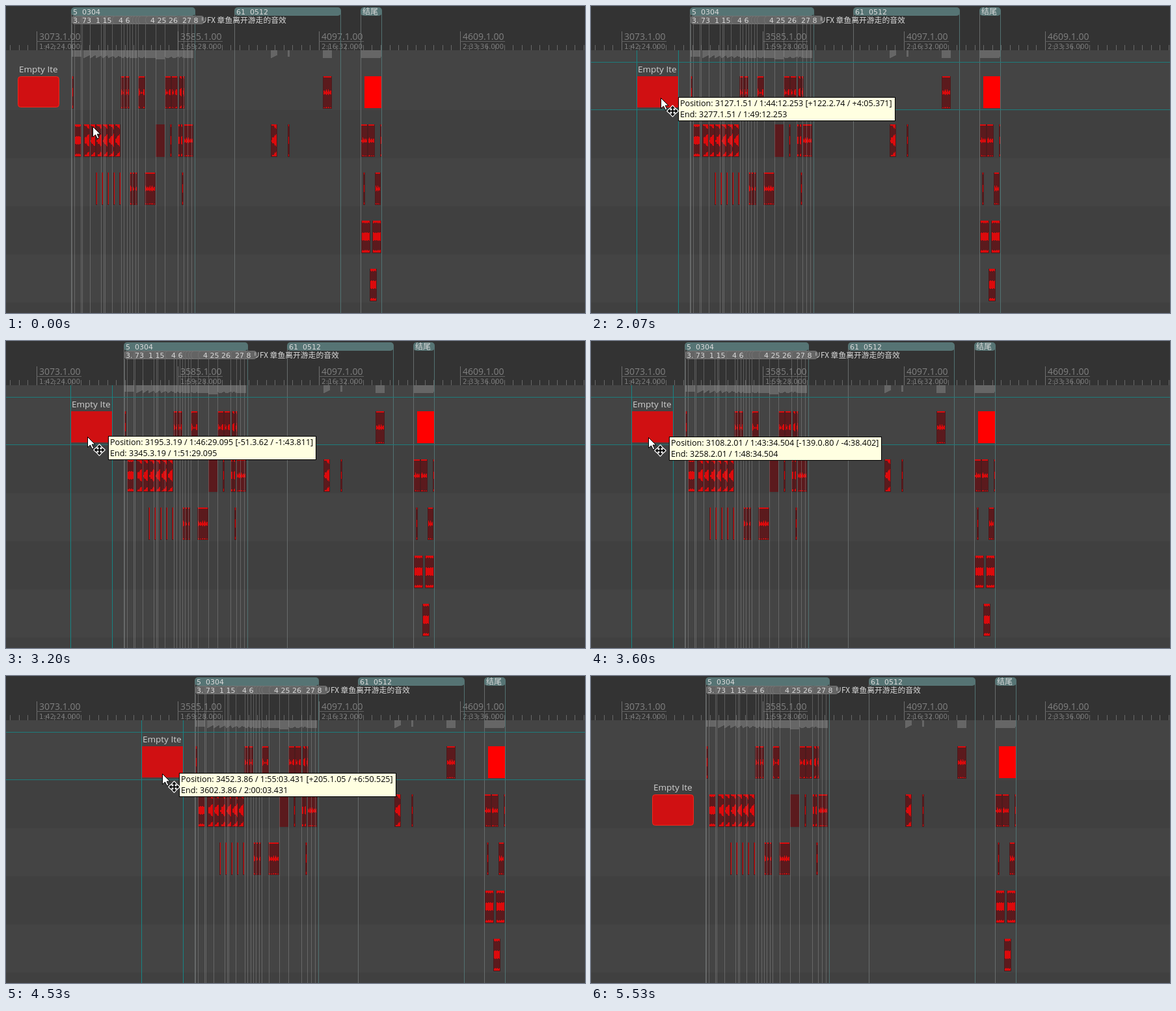
These frames come from a looping animation (890x472 px, 6190 ms). An HTML page with a canvas:

```html
<!DOCTYPE html>
<html lang="en">
<head>
<meta charset="utf-8">
<title>Timeline drag</title>
<style>
html, body { margin: 0; width: 100%; height: 100%; overflow: hidden; background: #444; }
canvas { display: block; }
</style>
</head>
<body>
<canvas id="stage" width="890" height="472"></canvas>
<script>
const W = 890, H = 472, LOOP = 6190, STEP = 200 / 3;
const TRACK = 74, SEC_PER_PX = 4.718677, START = 6006.882;
const ctx = document.getElementById('stage').getContext('2d');

const UI = '"Open Sans", "Noto Sans", sans-serif';
const SMALL = '"DejaVu Sans", "Noto Sans CJK SC", "Noto Sans CJK", sans-serif';
const CJK = '"Noto Sans CJK SC", "Noto Sans CJK", sans-serif';

const markers = [101, 105, 115, 117, 129, 146, 150, 152, 163];
for (let i = 0; i < 7; i++) markers.push(Math.round(177 + i * 4.3));
markers.push(214, 230, 244, 264, 273, 279, 285);

const clips = [];

// Fills a span of a track with equal clips
function addClips(track, shape, left, right = left + 3, count = 1) {
  const size = (right - left) / count;
  for (let i = 0; i < count; i++) {
    const x = Math.round(left + i * size);
    clips.push({ x, y: 108 + track * TRACK, w: Math.round(left + (i + 1) * size) - x, shape });
  }
}

addClips(0, 'mid', 101);
addClips(0, 'round', 176, 190, 2);
addClips(0, 'round', 203, 214);
addClips(0, 'round', 244, 264, 2);
addClips(0, 'fall', 266, 275, 2);
addClips(0, 'full', 487, 501);
addClips(0, 'bright', 551, 578);

addClips(1, 'mid', 105, 116);
addClips(1, 'fall', 119, 176, 6);
addClips(1, 'solid', 230, 244);
addClips(1, 'mid', 252);
addClips(1, 'mid', 264, 272, 2);
addClips(1, 'full', 273, 288);
addClips(1, 'fall', 407, 417);
addClips(1, 'mid', 433);
addClips(1, 'full', 545, 567, 2);
addClips(1, 'mid', 575);

for (let x = 138; x < 176; x += 9) addClips(2, 'mid', x, x + 2);
addClips(2, 'full', 190, 202, 3);
addClips(2, 'full', 213, 230);
addClips(2, 'mid', 270);
addClips(2, 'mid', 549);
addClips(2, 'full', 567, 576);

addClips(3, 'mid', 546, 560);
addClips(3, 'mid', 563, 577);
addClips(4, 'mid', 559, 570);

const envelope = {
  full: () => 0.92,
  mid: () => 0.68,
  solid: () => 1.4,
  bright: () => 0.5,
  fall: u => 1.08 - 0.9 * u,
  round: u => 0.3 + 0.75 * Math.sin(Math.PI * (0.15 + 0.8 * u))
};

// Motion keys: step (one fifteenth of a second), then value
const GRAB_1 = 20, DROP_1 = 41, GRAB_2 = 44, DROP_2 = 76, GONE = 83;
const shift = [[22, 0], [29, 37], [31, 52], [37, 97], [39, 97], [41, 103], [44, 103], [53, 53],
  [54, 44], [57, 32], [59, 10], [64, 223], [67, 180], [69, 200], [76, 76]];
const level = [[20, 133], [31, 141], [40, 146], [68, 150], [75, 184]];
const arrive = [[0, 133, 185], [4, 38, 95], [5, 30, 104], [8, 46, 133]];
const leave = [[76, 118, 180], [77, 110, 168], [83, 68, 480]];

function at(keys, n, col = 1) {
  const i = keys.findIndex(k => k[0] >= n);
  if (i < 0) return keys[keys.length - 1][col];
  if (i === 0) return keys[0][col];
  const a = keys[i - 1], b = keys[i];
  return a[col] + (b[col] - a[col]) * (n - a[0]) / (b[0] - a[0]);
}

function rect(x, y, w, h, color) {
  ctx.fillStyle = color;
  ctx.fillRect(x, y, w, h);
}

function text(s, x, y, font, color) {
  ctx.font = font;
  ctx.fillStyle = color;
  ctx.fillText(s, x, y);
}

function pill(x, y, w, h, r, fill, stroke) {
  ctx.beginPath();
  ctx.roundRect(x, y, w, h, r);
  ctx.fillStyle = fill;
  ctx.fill();
  if (stroke) {
    ctx.strokeStyle = stroke;
    ctx.lineWidth = 1;
    ctx.stroke();
  }
}

const pad = (v, n) => String(v).padStart(n, '0');

function clock(sec, short) {
  const ms = Math.round(sec * 1000), s = Math.floor(ms / 1000);
  const h = Math.floor(s / 3600), m = Math.floor(s / 60) % 60;
  const tail = ':' + pad(s % 60, 2) + '.' + pad(ms % 1000, 3);
  return short && !h ? m + tail : h + ':' + pad(m, 2) + tail;
}

// Two seconds per bar of four beats
function bars(sec, base) {
  const c = Math.round(sec * 200);
  return Math.floor(c / 400) + base + '.' + (Math.floor(c / 100) % 4 + base) + '.' + pad(c % 100, 2);
}

function drawBack() {
  rect(0, 0, W, 68, '#333');
  rect(0, 68, W, H - 68, '#444');
  for (let y = 160; y < H; y += 2 * TRACK) rect(0, y, W, TRACK, '#404040');
}

function drawRuler() {
  for (let k = -3; k < 64; k++) {
    const x = Math.round(47 + k * 217 / 16);
    if (k % 16) rect(x, 60, 1, 8, '#686868');
  }
  for (let i = 0; i < 4; i++) {
    const x = Math.round(47 + i * 217.1);
    rect(x, 39, 1, 29, '#707070');
    rect(x, 54, 69, 1, '#626262');
    text(3073 + 512 * i + '.1.00', x + 4, 52, '14px ' + UI, '#808080');
    text(clock(6144 + 1024 * i), x + 4, 66, '10.4px ' + SMALL, '#7c7c7c');
  }
}

function drawClip({ x, y, w, shape }) {
  if (shape === 'bright') return rect(x, y, w, 49, '#ff0000');
  if (shape === 'solid') return rect(x, y, w, 50, '#5b1a1d');
  rect(x, y, w, 50, '#4c1a1c');
  rect(x + 1, y, Math.max(1, w - 2), 49, '#dc0a0c');
  for (let i = 1; i < w - 1; i++) {
    const noise = 0.07 * Math.sin((x + i) * 1.9);
    const half = Math.max(1, Math.round(11 * (envelope[shape](i / w) + noise)));
    for (const mid of [11, 38]) rect(x + i, y + Math.max(2, mid - half), 1, 2 * half, '#5b1a1d');
  }
}

// The overview strip shows the peaks of every clip below it
function drawPeaks() {
  for (const { x, w, shape } of clips) {
    for (let i = 0; i < w; i++) rect(x + i, 68, 1, Math.round(6 + 6 * envelope[shape](i / w)), '#666');
  }
}

function drawRegion(a, b, name, font) {
  rect(a, 8, 1, H - 8, '#686c6c');
  rect(b - 1, 8, 1, H - 8, '#527272');
  pill(a, 2, b - a, 13, 5, '#567474');
  text(name, a + 3, 13, font, '#dcdcdc');
}

function drawMarkers() {
  for (const x of markers) rect(x, 28, 1, H - 28, 'rgba(160, 160, 160, 0.38)');
  drawRegion(100, 291, '5  0304', '11px ' + SMALL);
  drawRegion(351, 515, '61  0512', '11px ' + SMALL);
  drawRegion(545, 578, '结尾', '12px ' + CJK);
  pill(100, 15, 205, 13, 5, '#646464');
  for (const x of markers) pill(x + 0.5, 15.5, Math.min(22, 304 - x), 12, 5, '#646464', '#747474');
  text('3. 73  1 15   4 6         4 25 26  27 8 リ', 103, 26, '11px ' + SMALL, '#d8d8d8');
  text('FX 章鱼离开游走的音效', 309, 26, '11.8px ' + CJK, '#dcdcdc');
}

function drawItem(dx, track, dragging) {
  const x = 18 + dx, y = 108 + track * TRACK;
  if (dragging) rect(x + 1, y, 63, 48, '#d01012');
  else pill(x + 0.5, y + 0.5, 63, 47, 4, '#d01012', '#f02a1c');
  text('Empty Ite', x + 2, y - 6, '13.5px ' + UI, '#d0d0d0');
}

function drawGuides(dx, track) {
  for (const y of [86, 159]) rect(0, y + track * TRACK, W, 1, '#1c7c7c');
  for (const x of [18, 82]) rect(x + dx, 68, 1, H - 68, '#168484');
}

function drawTip(x, y, dx, from) {
  const sec = START + dx * SEC_PER_PX, delta = (dx - from) * SEC_PER_PX;
  let first = 'Position: ' + bars(sec, 1) + ' / ' + clock(sec);
  if (delta) {
    const sign = delta < 0 ? '-' : '+', d = Math.abs(delta);
    first += ' [' + sign + bars(d, 0) + ' / ' + sign + clock(d, true) + ']';
  }
  const font = '12.55px ' + UI;
  ctx.font = font;
  const w = Math.round(ctx.measureText(first).width) + 8;
  rect(x, y, w, 37, '#000');
  rect(x + 1, y + 1, w - 2, 35, '#ffffe1');
  text(first, x + 3, y + 14, font, '#000');
  text('End: ' + bars(sec + 300, 1) + ' / ' + clock(sec + 300), x + 3, y + 31, font, '#000');
}

function drawMoveIcon(x, y) {
  ctx.save();
  ctx.translate(x + 0.5, y + 0.5);
  ctx.beginPath();
  for (let i = 0; i < 4; i++) {
    for (const [px, py] of [[-1, 0], [-1, -4], [-3.5, -4], [0, -8], [3.5, -4], [1, -4], [1, 0]]) ctx.lineTo(px, py);
    ctx.closePath();
    ctx.rotate(Math.PI / 2);
  }
  ctx.strokeStyle = '#fff';
  ctx.lineWidth = 2.4;
  ctx.lineJoin = 'round';
  ctx.stroke();
  ctx.fillStyle = '#000';
  ctx.fill();
  ctx.restore();
}

function drawArrow(x, y) {
  const arrow = new Path2D('M.5 .5v16l4-3.5 3 6 2.5-1-2.8-6h4.8z');
  ctx.save();
  ctx.translate(x, y);
  ctx.fillStyle = '#fff';
  ctx.fill(arrow);
  ctx.strokeStyle = '#000';
  ctx.lineWidth = 1;
  ctx.stroke(arrow);
  ctx.restore();
}

function pointer(n, dx) {
  if (n < GRAB_1) return [at(arrive, n), at(arrive, n, 2)];
  if (n >= DROP_2) return [at(leave, n), at(leave, n, 2)];
  const grip = n < DROP_1 ? Math.min(52, 46 + 3 * (n - GRAB_1)) : 46;
  return [dx + grip, at(level, n)];
}

function draw(t) {
  const n = Math.floor((t + 3.4) / STEP);
  const dx = Math.round(at(shift, n));
  const first = n >= GRAB_1 && n < DROP_1;
  const dragging = first || (n >= GRAB_2 && n < DROP_2);
  const [px, py] = pointer(n, dx).map(Math.round);
  const track = n >= DROP_2 || (dragging && py >= 160) ? 1 : 0;

  drawBack();
  drawRuler();
  ctx.save();
  ctx.translate(dx, 0);
  drawPeaks();
  clips.forEach(drawClip);
  drawMarkers();
  ctx.restore();
  drawItem(dx, track, dragging);
  if (dragging) {
    const lead = Math.round(0.4 * (at(shift, n + 1) - at(shift, n)));
    drawGuides(dx, track);
    drawTip(px + 30, py - 1, dx, first ? 0 : 103);
    drawMoveIcon(px + lead + 18, py + 20);
    drawArrow(px + lead, py);
  } else if (n < GONE) {
    drawArrow(px, py);
  }
}

const begin = performance.now();
function tick() {
  draw((performance.now() - begin) % LOOP);
  requestAnimationFrame(tick);
}
tick();
</script>
</body>
</html>
```
